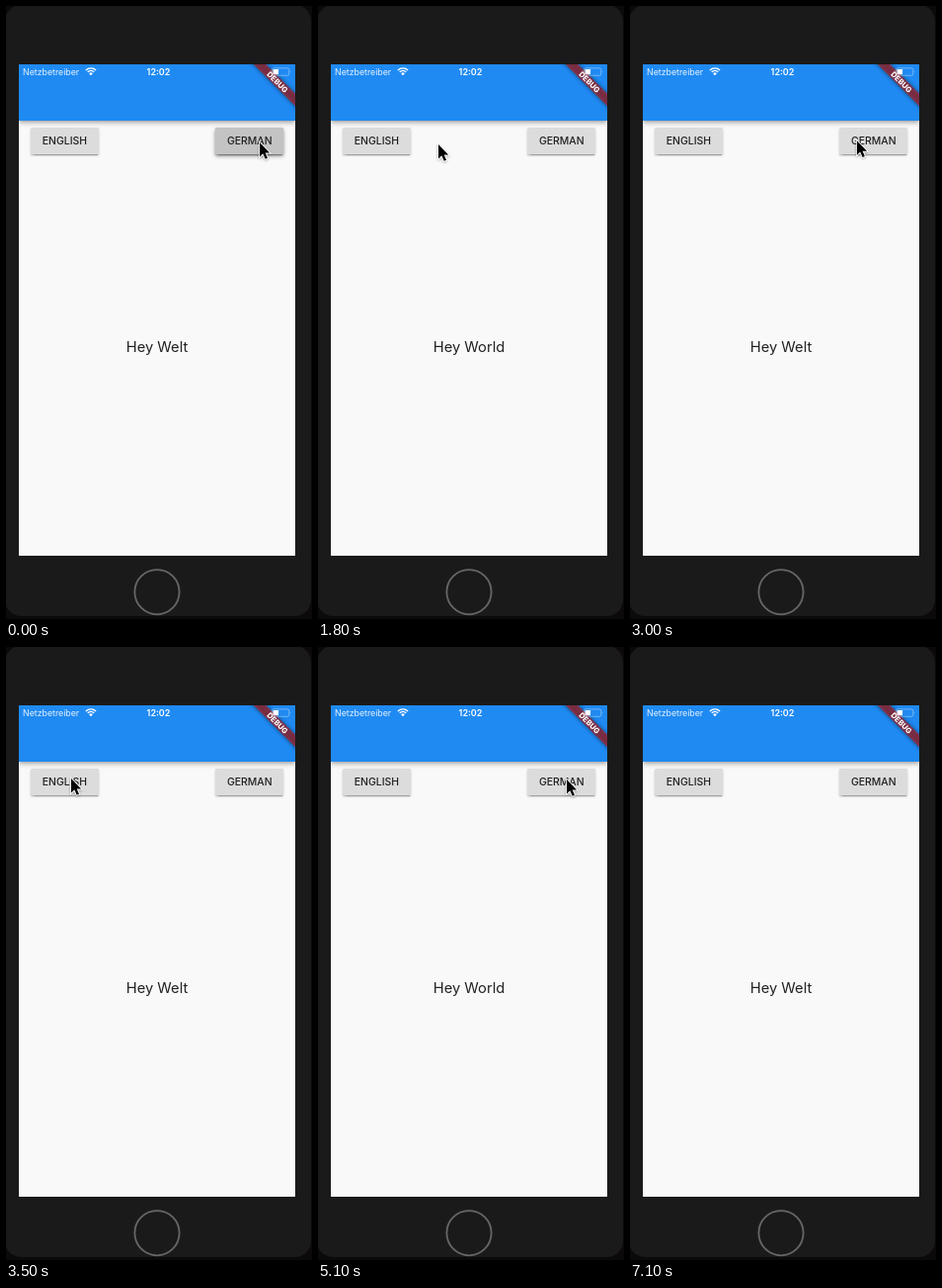
Recreate the animation shown at these times as an HTML page. Size 310 px wide and 620 px high, loop 7600 ms.

```html
<!DOCTYPE html>
<html lang="en">
<head>
<meta charset="utf-8">
<title>Language switch</title>
<style>
  html, body { margin: 0; width: 100%; height: 100%; overflow: hidden; background: #0b0909; }
  body { position: relative; font-family: Inter, sans-serif; }
  div, svg { position: absolute; }
  #phone { left: -1px; top: -1px; width: 310px; height: 618px; border-radius: 16px; background: #1a1a1a; }
  #screen { left: 13px; top: 59px; width: 280px; height: 497px; overflow: hidden; background: #f9f9f9; }
  #bar {
    width: 280px; height: 56.6px; background: #1f8af2;
    box-shadow: 0 1.5px 3px -1px rgba(0,0,0,.2), 0 3px 4px rgba(0,0,0,.14), 0 1px 7px rgba(0,0,0,.12);
  }
  .button {
    top: 64.3px; width: 69.3px; height: 27px; border-radius: 1.5px; background: #dcdcdc;
    box-shadow: 0 2px 1px -1.5px rgba(0,0,0,.2), 0 1.5px 1.5px rgba(0,0,0,.14), 0 1px 3px rgba(0,0,0,.12);
  }
  .press {
    inset: 0; border-radius: 1.5px; background: #c3c3c3; opacity: 0;
    box-shadow: 0 2px 4px rgba(0,0,0,.32);
  }
  #english { left: 11.8px; }
  #german { left: 199.2px; }
  svg { left: 0; top: 0; }
</style>
</head>
<body>
<div id="phone"></div>
<div id="screen">
  <div id="bar"></div>
  <div id="english" class="button"><div class="press"></div></div>
  <div id="german" class="button"><div class="press"></div></div>
</div>
<svg width="310" height="620" viewBox="0 0 310 620" font-family="Inter, sans-serif">
  <defs>
    <clipPath id="glass"><rect x="13" y="59" width="280" height="497"/></clipPath>
    <filter id="soft" x="-20%" y="-100%" width="140%" height="300%"><feGaussianBlur stdDeviation="2"/></filter>
    <filter id="drop" x="-50%" y="-50%" width="200%" height="200%">
      <feDropShadow dx="0" dy="1" stdDeviation=".8" flood-opacity=".35"/>
    </filter>
  </defs>

  <g clip-path="url(#glass)">
    <g transform="translate(293 59) rotate(45)">
      <rect x="-40" y="20.9" width="80" height="9" opacity=".5" filter="url(#soft)"/>
      <rect x="-40" y="20.9" width="80" height="9" fill="#b71c1c" fill-opacity=".627"/>
      <text y="28.2" font-size="7.6" font-weight="800" text-anchor="middle" fill="#fff">DEBUG</text>
    </g>
  </g>

  <g fill="#fff">
    <text x="17" y="70" font-size="8.8" fill-opacity=".88">Netzbetreiber</text>
    <text x="154.5" y="70" font-size="9" font-weight="600" text-anchor="middle">12:02</text>
    <path d="M86 70.3 L84.1 68.3 A2.7 2.7 0 0 1 87.9 68.3 Z"/>
    <g fill="none" stroke="#fff" stroke-width="1.4">
      <path d="M82.7 66.8 A4.7 4.7 0 0 1 89.3 66.8"/>
      <path d="M80.9 65 A7.2 7.2 0 0 1 91.1 65"/>
    </g>
    <rect x="269.4" y="62.9" width="17.4" height="7.4" rx="1.6" fill="none" stroke="#fff" stroke-opacity=".45" stroke-width=".8"/>
    <rect x="270.5" y="64" width="5.6" height="5.2" rx=".5"/>
    <path d="M287.8 65.3 Q289 66.6 287.8 67.9 Z" fill-opacity=".5"/>
  </g>

  <g fill="#212121" text-anchor="middle">
    <g font-size="10.45" font-weight="500">
      <text x="59.4" y="140.2">ENGLISH</text>
      <text x="246.8" y="140.2">GERMAN</text>
    </g>
    <text id="label" x="153" y="350" font-size="14.7">Hey Welt</text>
  </g>

  <circle cx="153" cy="592.7" r="22.6" fill="none" stroke="#676767" stroke-width="1.8"/>

  <g id="cursor">
    <circle id="ring" cy="1.3" r="20.3" fill="none" stroke="#000" stroke-width="3"/>
    <path d="M0 0 V14.4 L3.3 11.3 L5.7 16.7 L8 15.7 L5.7 10.4 H10.2 Z"
      stroke="#fff" stroke-width="1.6" paint-order="stroke" filter="url(#drop)"/>
  </g>
</svg>
<script>
  const LOOP = 7600, STEP = 100;

  // Pointer track: time, x, y
  const track = [
    [0, 257, 138], [300, 257, 138], [1100, 49, 137], [1200, 49, 137], [1300, 46, 137],
    [1700, 46, 137], [1800, 122, 140], [2100, 197, 144], [2500, 243, 136.5],
    [2900, 243, 136.5], [3500, 66, 133], [4200, 66, 133], [4700, 252, 134],
    [6300, 252, 134], [6400, 9, 265]
  ];
  const EXIT = 6500;

  // Taps: button, pointer down, pointer up
  const taps = [
    ['german', -100, 0], ['english', 1300, 1400], ['german', 2500, 2600],
    ['english', 4000, 4100], ['german', 5700, 5900]
  ];

  const $ = id => document.getElementById(id);
  const cursor = $('cursor'), ring = $('ring'), label = $('label');
  const overlay = {
    english: $('english').firstElementChild,
    german: $('german').firstElementChild
  };
  const words = { english: 'Hey World', german: 'Hey Welt' };
  const ease = u => u * u * (3 - 2 * u);

  function pointer(t) {
    const i = track.findIndex(p => p[0] > t);
    if (i < 0) return track[track.length - 1].slice(1);
    const [t0, x0, y0] = track[i - 1], [t1, x1, y1] = track[i];
    let u = (t - t0) / (t1 - t0);
    u = t0 === 1800 || t0 === 2100 ? u * (1.4 - 0.4 * u) : ease(u);
    return [x0 + (x1 - x0) * u, y0 + (y1 - y0) * u];
  }

  function render(t) {
    const [x, y] = pointer(t);
    cursor.setAttribute('transform', `translate(${x} ${y})`);
    cursor.style.display = t < EXIT ? '' : 'none';

    const level = { english: 0, german: 0 };
    let word = words.german, held = false;
    for (const [name, down, up] of taps) {
      if (t >= down && t < up) held = true;
      if (t >= up) word = words[name];
      if (t > down) level[name] = Math.max(level[name], 1 - Math.abs(t - up) / 200);
    }
    ring.style.display = held ? '' : 'none';
    if (label.textContent !== word) label.textContent = word;
    for (const name in overlay) overlay[name].style.opacity = level[name];
  }

  const start = performance.now();
  function tick() {
    const t = (performance.now() - start) % LOOP;
    render(Math.floor(t / STEP) * STEP);
    requestAnimationFrame(tick);
  }
  tick();
</script>
</body>
</html>
```
